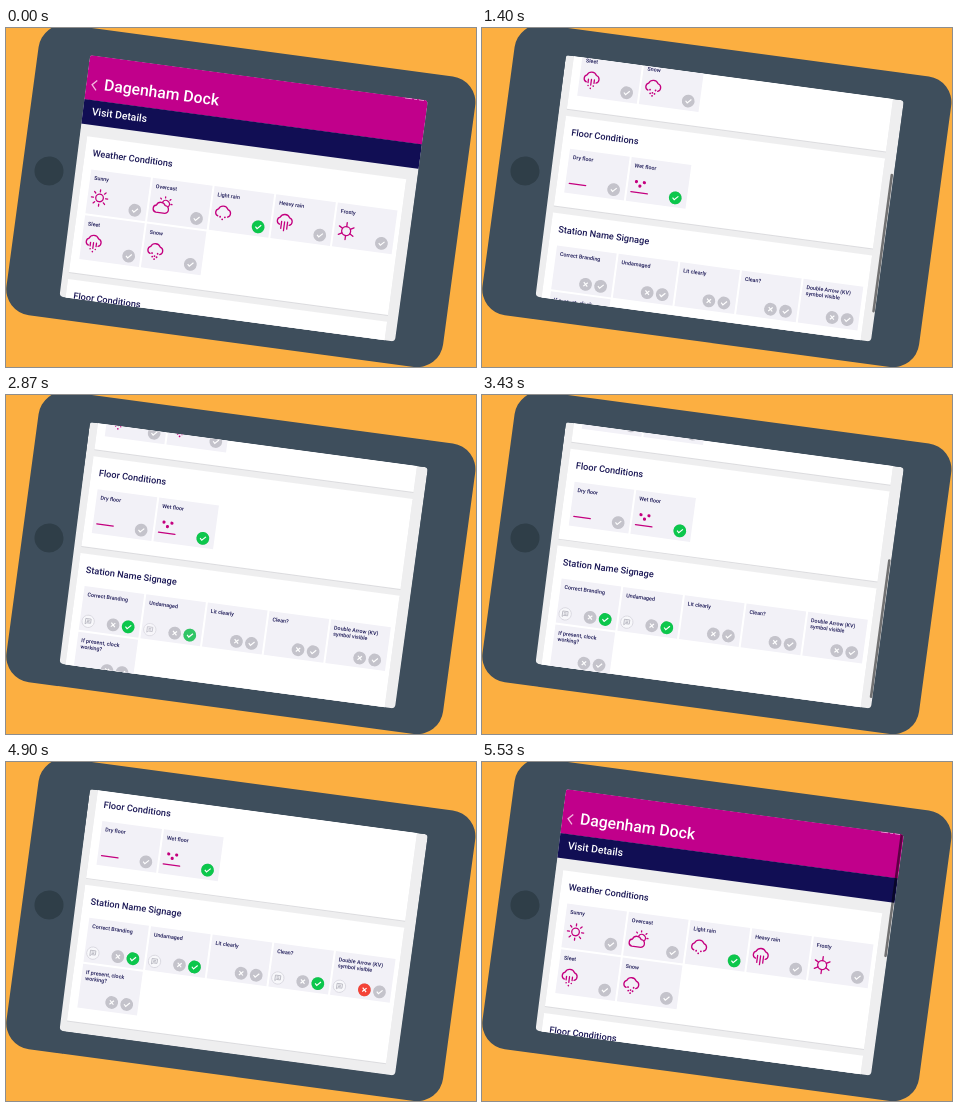
An HTML page for the animation above (5950 ms loop, 470x339 px).

```html
<!DOCTYPE html>
<html lang="en">
<head>
<meta charset="utf-8">
<title>Visit checklist on a tablet</title>
<style>
  html, body { margin: 0; width: 100%; height: 100%; overflow: hidden; background: #fcaf41; }
  svg { display: block; width: 100%; height: 100%; }
  text { font-family: Roboto, Arial, sans-serif; font-weight: 500; fill: #1a1755; text-rendering: geometricPrecision; }
  .station { font-size: 15.8px; fill: #fff; }
  .heading { font-size: 10.4px; fill: #fff; }
  .title { font-size: 9.2px; }
  .label { font-size: 5.4px; }
  .icon { fill: none; stroke: #c4007f; stroke-width: 1.3; stroke-linecap: round; stroke-linejoin: round; }
  .icon .dot { fill: #c4007f; stroke: none; }
  .mark { fill: none; stroke: #fff; stroke-width: 1.15; }
</style>
</head>
<body>
<svg viewBox="0 0 470 339" preserveAspectRatio="none">
  <defs>
    <clipPath id="screen">
      <path d="M3 0H337Q341 0 341 4L340.3 240Q340 243.5 336 243.5H6Q2 243.5 1.9 240L0 3Q0 0 3 0Z"/>
    </clipPath>
  </defs>
  <rect width="470" height="339" fill="#fcaf41"/>
  <g transform="translate(84 27) rotate(7.65)">
    <rect x="-52" y="-27" width="440.5" height="293" rx="26" fill="#3e4e5c"/>
    <circle cx="-25.2" cy="120.4" r="14.5" fill="#2f3e48"/>
    <g clip-path="url(#screen)">
      <rect width="342" height="244" fill="#eeeeef"/>
      <g id="page">
        <rect y="-5" width="342" height="49.6" fill="#c1008b"/>
        <rect y="44.3" width="342" height="24.8" fill="#110e54"/>
        <path d="M318 .6h7m2 0h3m2 0h5" stroke="#fff" stroke-opacity=".6"/>
        <path d="M10.6 24.2L6 29.2l4.6 5" fill="none" stroke="#f3b6df" stroke-width="1.3"/>
        <text x="18" y="33.2" class="station">Dagenham Dock</text>
        <text x="9.4" y="59.2" class="heading">Visit Details</text>
      </g>
      <rect id="bar" x="337.6" width="2.6" height="140" rx="1.3" fill="#000" fill-opacity=".52"/>
    </g>
  </g>
</svg>
<script>
const LOOP = 5950, STEP = 70, FADE = 350;
const GREY = '#c4c3cb', GREEN = '#0cc74c', RED = '#f44336';
const COLUMN = 62.2, ROW = 46.2, CELL_GAP = 2;
const page = document.getElementById('page');
const bar = document.getElementById('bar');

function add(parent, tag, attrs = {}, text = '') {
  const node = document.createElementNS('http://www.w3.org/2000/svg', tag);
  for (const key in attrs) node.setAttribute(key, attrs[key]);
  node.textContent = text;
  parent.append(node);
  return node;
}
const group = (parent, x, y, cls = '') =>
  add(parent, 'g', { transform: `translate(${x} ${y})`, class: cls });
const stroke = (parent, d, cls = '') => add(parent, 'path', { d, class: cls });

function rays(g, count, from, to, turn = 0) {
  for (let i = 0; i < count; i++) {
    const a = turn + i * 2 * Math.PI / count, c = Math.cos(a), s = Math.sin(a);
    stroke(g, `M${c * from} ${s * from}L${c * to} ${s * to}`);
  }
}
// Three drops: two side by side and one below, between them.
function trio(g, y, gap, r = 0.9) {
  for (const side of [-1, 0, 1])
    add(g, 'circle', { cx: side * gap, cy: side ? y : y + gap, r, class: 'dot' });
}
const streaks = (g, length) =>
  [-3, 0, 3].forEach(x => stroke(g, `M${x}-1v${x ? length : length + 2}`));
const openCloud = g => stroke(g, 'M-4.8 2A3.7 3.7 0 0 1 -5-5A5.2 5.2 0 0 1 4.4-5.6A4 4 0 0 1 5 2');

// Icons are centred on the origin.
const icons = {
  sun(g) { add(g, 'circle', { r: 3.8 }); rays(g, 8, 6.2, 8.2); },
  overcast(g) {
    stroke(g, 'M-4.6 6.5A3.6 3.6 0 0 1 -4.8-.6A4.6 4.6 0 0 1 3.8-1.2A3.9 3.9 0 0 1 4.6 6.5Z');
    stroke(g, 'M1-4.6A3.6 3.6 0 0 1 7.4-.8');
    rays(group(g, 3.6, -2.4), 8, 6, 7.2, Math.PI / 8).parentNode;
  },
  light(g) { openCloud(g); trio(g, 2.6, 2.4); },
  heavy(g) { openCloud(g); streaks(g, 7); },
  frost(g) { add(g, 'circle', { r: 4.5 }); rays(g, 6, 4.5, 8.5, Math.PI / 6); },
  sleet(g) { openCloud(g); streaks(g, 3.6); trio(g, 5.4, 2.6, .8); },
  snow(g) { openCloud(g); trio(g, 1.4, 2.8); trio(g, 5, 2.2); },
  dry(g) { stroke(g, 'M-8.2 7.2H8.4'); },
  wet(g) { icons.dry(g); trio(g, -3.4, 4, 1.6); }
};
icons.overcast = g => {
  stroke(g, 'M-4.6 6.5A3.6 3.6 0 0 1 -4.8-.6A4.6 4.6 0 0 1 3.8-1.2A3.9 3.9 0 0 1 4.6 6.5Z');
  stroke(g, 'M1-4.6A3.6 3.6 0 0 1 7.4-.8M3.2-8.9v-1M8-7l.8-.9M9.4-3h1.1M-.8-7.2l-.7-.8');
};

const marks = { tick: 'M-2.7 .1L-.8 2L2.9-1.9', cross: 'M-2-2L2 2M2-2L-2 2' };
function button(parent, kind, color) {
  const g = group(parent, kind === 'tick' ? 48.6 : 33.4, 34.7);
  add(g, 'circle', { r: 6.4, fill: color });
  stroke(g, marks[kind], 'mark');
}
function comment(parent) {
  const g = group(parent, 8.2, 34.5);
  add(g, 'circle', { r: 6.2, fill: '#f8f8fb', stroke: '#d6d5dd', 'stroke-width': .8 });
  add(g, 'path', {
    d: 'M-2.7-2.6H2.7V1.6H-1.2L-2.7 2.9ZM-1.4-1.1H1.4M-1.4 .3H1.4',
    fill: 'none', stroke: '#b4b3bd', 'stroke-width': .8
  });
}

// An answer fades in from the time in "yes" or "no".
const answers = [];
function cell(x, y, { label, icon, yes, no }) {
  const g = group(page, x, y);
  add(g, 'rect', { width: COLUMN - CELL_GAP, height: ROW - CELL_GAP, fill: '#f2f1f7' });
  label.split('|').forEach((line, i) =>
    add(g, 'text', { x: 4, y: 9.8 + i * 6.2, class: 'label' }, line));
  if (icon) icons[icon](group(g, 12, 27.2, 'icon'));
  else button(g, 'cross', GREY);
  button(g, 'tick', GREY);

  const start = yes ?? no;
  if (start === undefined) return;
  const node = add(g, 'g');
  if (!icon) comment(node);
  if (yes !== undefined) button(node, 'tick', GREEN);
  else button(node, 'cross', RED);
  answers.push({ node, start });
}

let cardTop = 81;
function card(title, items) {
  const gridTop = cardTop + 32.2;
  const height = 44.5 + Math.ceil(items.length / 5) * ROW;
  const box = { x: 8, width: 322, height };
  add(page, 'rect', { ...box, y: cardTop + 1, fill: '#dcdcdf' });
  add(page, 'rect', { ...box, y: cardTop, fill: '#fff' });
  add(page, 'text', { x: 15.6, y: gridTop - 13.3, class: 'title' }, title);
  items.forEach((item, i) =>
    cell(16.5 + i % 5 * COLUMN, gridTop + Math.floor(i / 5) * ROW, item));
  cardTop += height + 7;
}

card('Weather Conditions', [
  { label: 'Sunny', icon: 'sun' },
  { label: 'Overcast', icon: 'overcast' },
  { label: 'Light rain', icon: 'light', yes: -FADE },
  { label: 'Heavy rain', icon: 'heavy' },
  { label: 'Frosty', icon: 'frost' },
  { label: 'Sleet', icon: 'sleet' },
  { label: 'Snow', icon: 'snow' }
]);
card('Floor Conditions', [
  { label: 'Dry floor', icon: 'dry' },
  { label: 'Wet floor', icon: 'wet', yes: 770 }
]);
card('Station Name Signage', [
  { label: 'Correct Branding', yes: 2030 },
  { label: 'Undamaged', yes: 2590 },
  { label: 'Lit clearly' },
  { label: 'Clean?', yes: 4340 },
  { label: 'Double Arrow (KV)|symbol visible', no: 4550 },
  { label: 'If present, clock|working?' }
]);

const clamp = v => Math.min(1, Math.max(0, v));
const smooth = v => v * v * (3 - 2 * v);
const linear = v => v;

const swipes = [
  { start: 0, end: 350, to: 138, ease: smooth },
  { start: 1190, end: 1610, to: 191.5, ease: linear },
  { start: 3080, end: 3430, to: 199, ease: linear },
  { start: 3990, end: 4200, to: 227, ease: smooth },
  { start: 5040, end: 5530, to: 0, ease: smooth }
];

// The scroll bar shows with each swipe, stays a while and fades out.
function view(t) {
  let scroll = 0, barOpacity = 0;
  for (const { start, end, to, ease } of swipes) {
    if (t <= start) break;
    scroll += (to - scroll) * ease(clamp((t - start) / (end - start)));
    barOpacity = 1 - clamp((t - end - FADE) / 140);
  }
  return { scroll, barOpacity };
}

function render(now) {
  const t = Math.floor(now % LOOP / STEP) * STEP;
  const { scroll, barOpacity } = view(t);
  page.setAttribute('transform', `translate(0 ${-scroll})`);
  bar.setAttribute('y', scroll * .547 - 15.9);
  bar.setAttribute('opacity', barOpacity);
  for (const { node, start } of answers)
    node.setAttribute('opacity', clamp((t - start) / FADE));
}

const began = performance.now();
function tick() {
  render(performance.now() - began);
  requestAnimationFrame(tick);
}
tick();
</script>
</body>
</html>
```
